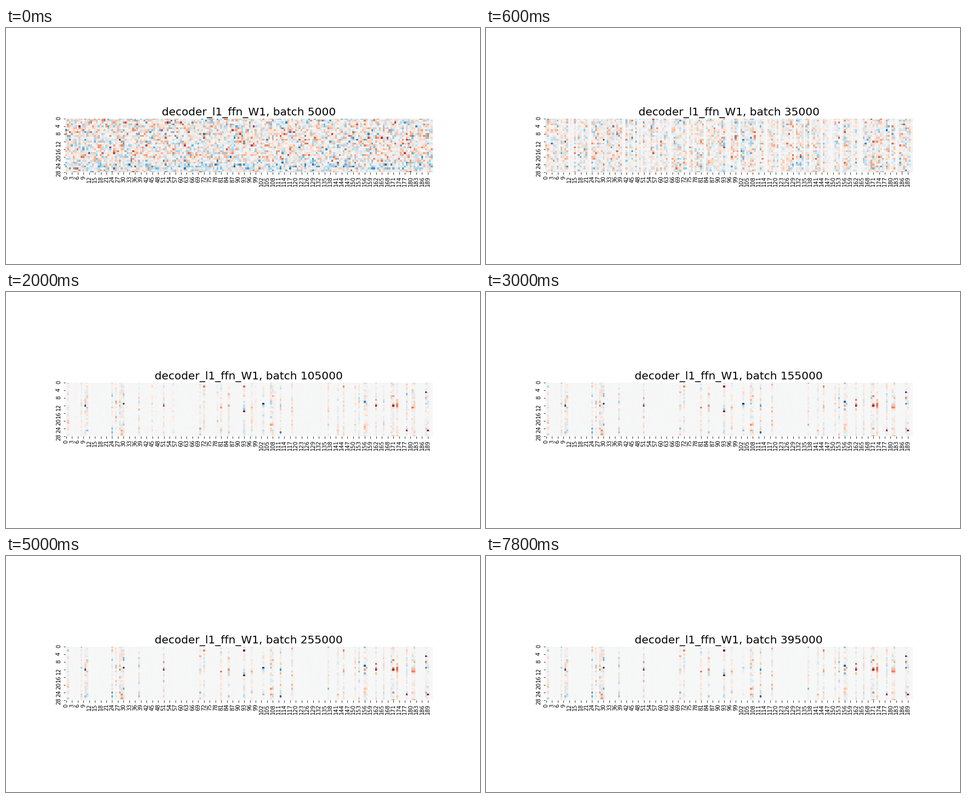
These frames come from a looping animation (864x432 px, 8 s). A matplotlib script:

```python
import numpy as np
import matplotlib.pyplot as plt
from matplotlib.animation import FuncAnimation

ROWS, COLS, FRAMES = 29, 192, 40
rng = np.random.default_rng(11)

# Columns that keep their weights to the end; all others die out
ALIVE = [1, 8, 10, 11, 24, 26, 28, 29, 30, 38, 51, 70, 72, 81, 85, 93, 97, 107, 108,
         112, 118, 137, 142, 145, 151, 153, 156, 157, 162, 166, 170, 171, 173, 178,
         181, 182, 188, 189]
FADING = 103

# Strongest cells: row, column, value (positive is blue)
PEAKS = [(11, 30, .95), (11, FADING, 1), (12, 10, .85), (5, 188, -.84), (12, 162, -.82),
         (12, 171, -.86), (15, 93, -.86), (25, 178, -.86)]

# Most columns die early, a few linger
death = rng.gamma(3, 1.3, COLS)
death[FADING] = 35
width = .3 + .12 * death
death[ALIVE] = 1000


def bump(center, spread):
    return np.exp(-((np.arange(ROWS) - center) / spread) ** 2)[:, None]


# Rows lean red in the upper part and blue near the bottom
bias = .11 * bump(25, 2) - .04 * bump(8, 4) - .05 * bump(18, 2)
strength = .75 + .4 * bump(12, 2) + .4 * bump(25, 2) - .4 * bump(16.5, 1)
gain = rng.uniform(.7, 1.1, COLS)

start = rng.normal(0, .23, (ROWS, COLS)) + bias
middle = rng.normal(-.01, .28, (ROWS, COLS))
end = .17 * rng.standard_t(5, (ROWS, COLS)) * strength * gain - .02


def life(k):
    def fade(t):
        return 1 / (1 + np.exp((t - death) / width))
    return fade(k) / fade(0)


def weights(k):
    a = np.exp(-(k / 2.2) ** 2)
    b = np.exp(-(k / 9) ** 2)
    w = a * start + (1 - a) * (b * middle + (1 - b) * end)
    grown = 1 - np.exp(-k / 3)
    for r, c, v in PEAKS:
        w[r, c] += (v - w[r, c]) * grown
    return np.clip(w * life(k), -.85, 1)


fig = plt.figure(figsize=(12, 6), dpi=72, facecolor="white")
fig.subplots_adjust(left=.125, right=.9, bottom=.125, top=.88)
ax = fig.add_subplot()
mesh = ax.pcolormesh(weights(0), cmap="RdBu", vmin=-1, vmax=1)
ax.set_aspect("equal")
ax.set_xlim(0, COLS)
ax.set_ylim(ROWS - .5, .5)
ax.spines[:].set_visible(False)
ax.set_xticks(np.arange(0, COLS, 3) + .5, range(0, COLS, 3), rotation=90)
ax.set_yticks(np.arange(0, ROWS, 4) + .5, range(0, ROWS, 4), rotation=90)
title = ax.set_title("", fontsize=20)


def draw(k):
    mesh.set_array(weights(k))
    title.set_text(f"decoder_l1_ffn_W1, batch {5000 + 10000 * k}")
    return mesh, title


anim = FuncAnimation(fig, draw, frames=FRAMES, interval=200, repeat=True, repeat_delay=0)
plt.show()
```
